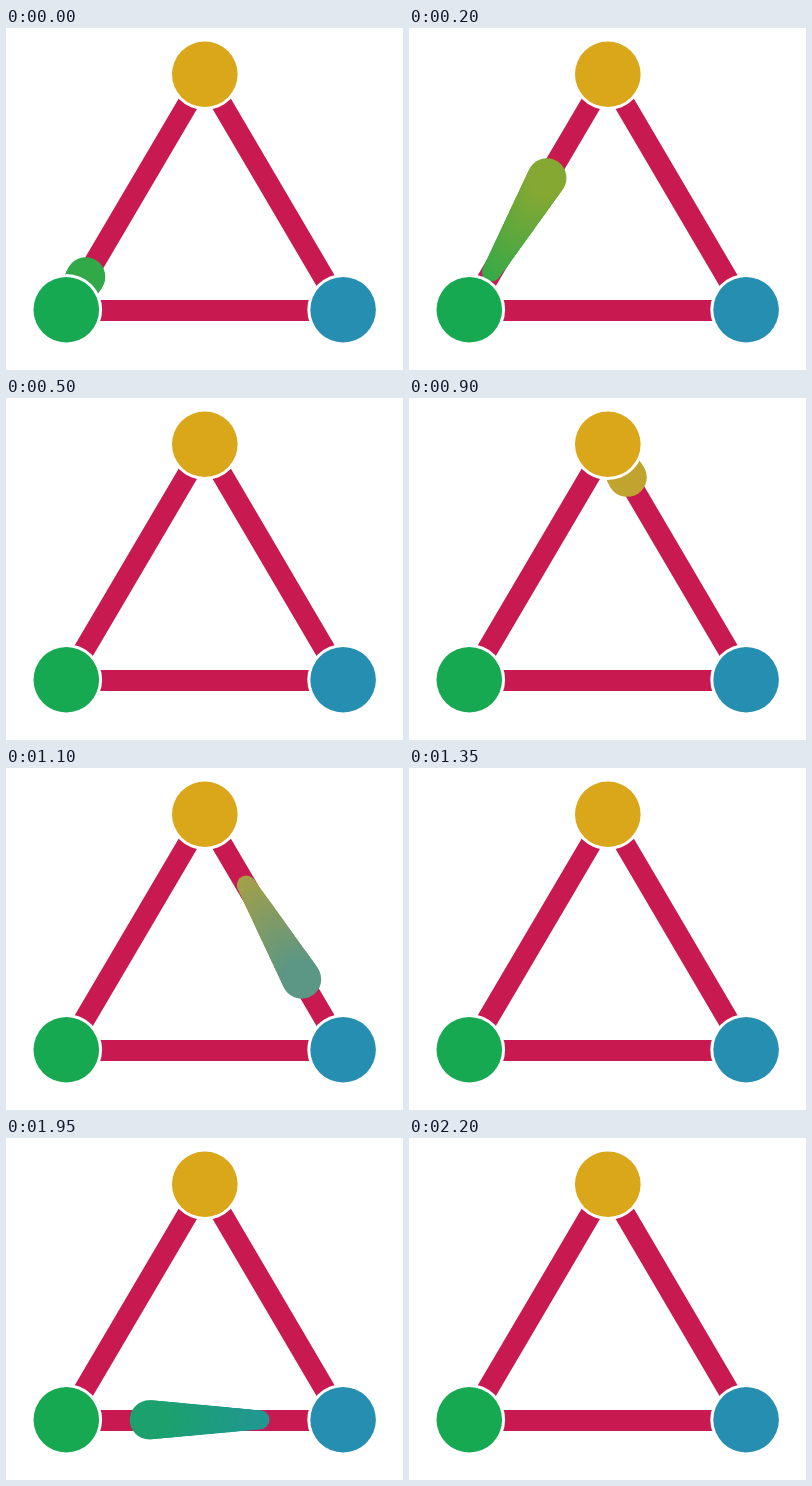
Write an HTML page with a canvas that moves like this. It is 397 px wide and 342 px high and loops after 2.6 s.

```html
<!DOCTYPE html>
<html lang="en">
<head>
<meta charset="utf-8">
<title>Triangle relay</title>
<style>
  html, body { margin: 0; width: 100%; height: 100%; overflow: hidden; background: #fff; }
  canvas { display: block; }
</style>
</head>
<body>
<canvas id="stage" width="397" height="342"></canvas>
<script>
const ctx = document.getElementById('stage').getContext('2d');

const LOOP = 2600, LEAD = 50, LEG = 850, STEP = 50;
const STRIDE = 0.14, TRAIL = 0.4, DISCS = 50;
const HEAD_R = 19.6, TAIL_R = 9.5, NODE_R = 32.8, RING_R = 35.8;

const nodes = [
  { x: 60.3, y: 281.8, rgb: [23, 169, 81] },
  { x: 198.8, y: 46.3, rgb: [218, 167, 26] },
  { x: 337.1, y: 281.8, rgb: [38, 143, 177] }
];

const mix = (a, b, p) => a + (b - a) * p;
const css = rgb => `rgb(${rgb.map(Math.round)})`;

function disc(x, y, r, fill) {
  ctx.fillStyle = fill;
  ctx.beginPath();
  ctx.arc(x, y, r, 0, Math.PI * 2);
  ctx.fill();
}

function drawTriangle() {
  ctx.strokeStyle = '#c81950';
  ctx.lineWidth = 21;
  ctx.beginPath();
  nodes.forEach(n => ctx.lineTo(n.x, n.y + 0.6));
  ctx.closePath();
  ctx.stroke();
}

// Discs stacked from tail to head, each coloured by its place on the edge.
function drawComet(from, to, head) {
  for (let i = 0; i <= DISCS; i++) {
    const u = i / DISCS;
    const p = head - TRAIL * (1 - u);
    if (p < 0 || p > 1) continue;
    const rgb = from.rgb.map((c, j) => mix(c, to.rgb[j], p));
    disc(mix(from.x, to.x, p), mix(from.y, to.y, p), mix(TAIL_R, HEAD_R, u), css(rgb));
  }
}

function draw(now) {
  const t = Math.max(0, now % LOOP - LEAD);
  const leg = Math.floor(t / LEG);
  const step = Math.floor(t % LEG / STEP);

  ctx.fillStyle = '#fff';
  ctx.fillRect(0, 0, 397, 342);
  drawTriangle();
  drawComet(nodes[leg], nodes[(leg + 1) % 3], STRIDE * (step + 1));
  for (const n of nodes) {
    disc(n.x, n.y, RING_R, '#fff');
    disc(n.x, n.y, NODE_R, css(n.rgb));
  }
}

const start = performance.now();
function tick() {
  draw(performance.now() - start);
  requestAnimationFrame(tick);
}
tick();
</script>
</body>
</html>
```
